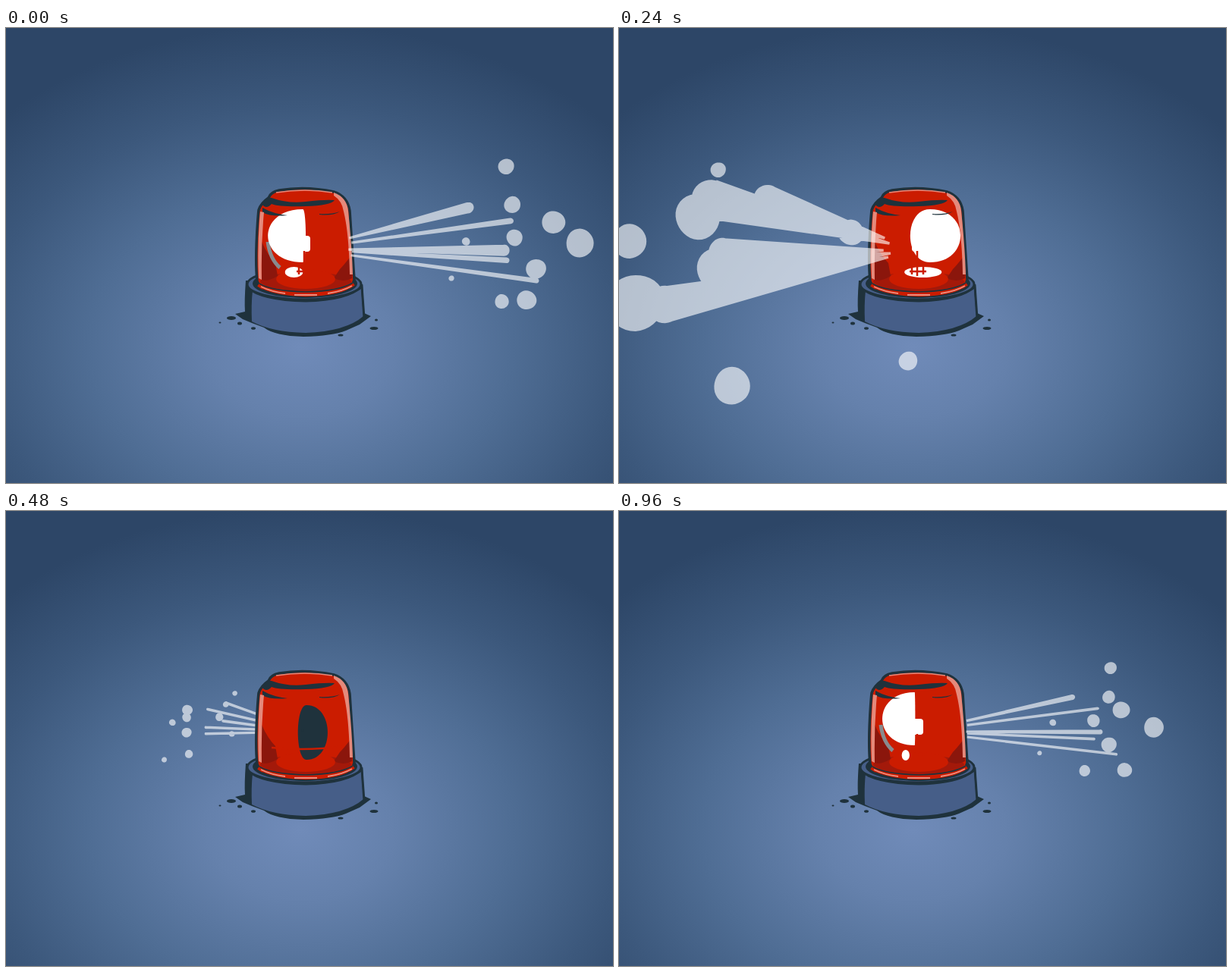
Recreate the animation shown at these times as an HTML page. Size 800x600 px, loop 1 s.

```html
<!DOCTYPE html>
<html lang="en">
<head>
<meta charset="utf-8">
<title>Beacon</title>
<style>
html, body { margin: 0; width: 100%; height: 100%; overflow: hidden; background: #2d4667; }
svg { display: block; width: 100%; height: 100%; }
.ink { fill: #1f323c; }
.red { fill: #cb1c00; }
.deep { fill: #8b160c; }
.shine { fill: #e5897b; }
.blue { fill: #465e88; }
.white { fill: #fff; }
.line { fill: none; stroke: #1f323c; stroke-width: 3; }
.thin { fill: none; stroke: #cb1c00; stroke-width: 2.5; }
.veil { fill: #fff; opacity: .62; }
</style>
</head>
<body>
<svg viewBox="0 0 800 600">
  <defs>
    <radialGradient id="floor" gradientUnits="userSpaceOnUse" cx="0" cy="0" r="1"
      gradientTransform="translate(388 420) scale(560 425)">
      <stop offset="0" stop-color="#708bb9"/>
      <stop offset=".22" stop-color="#6581ac"/>
      <stop offset=".5" stop-color="#4f6d94"/>
      <stop offset=".75" stop-color="#3c587c"/>
      <stop offset="1" stop-color="#2d4667"/>
    </radialGradient>
  </defs>
  <rect width="800" height="600" fill="url(#floor)"/>
  <path id="behind" class="veil"/>

  <g class="ink">
    <path d="M316 333Q314 360 315 374L302 377L312 384L324 389L340 395Q354 406 392 407Q430 406 448 399L466 391L481 380L472 376L470 338Z"/>
    <ellipse cx="297" cy="382.500" rx="6" ry="2.500"/>
    <ellipse cx="308" cy="389.500" rx="3" ry="2"/>
    <ellipse cx="282" cy="388.500" rx="1.500" ry="1"/>
    <ellipse cx="326" cy="396" rx="3" ry="1.800"/>
    <ellipse cx="488" cy="385" rx="2" ry="1.500"/>
    <ellipse cx="485" cy="396" rx="5.500" ry="2"/>
    <ellipse cx="441" cy="405" rx="3.500" ry="1.600"/>
  </g>
  <ellipse class="blue" cx="393" cy="338" rx="75" ry="20" stroke="#1f323c" stroke-width="3"/>
  <ellipse class="ink" cx="394" cy="337" rx="69" ry="19"/>
  <path class="blue" d="M325 346Q342 359 395 360Q446 359 468 344L471 380Q448 400 395 402Q350 401 324 387Q323 365 325 346Z"/>
  <path class="line" d="M318 342Q336 359 395 360Q450 359 469 341L472 382"/>

  <path class="red" stroke="#1f323c" stroke-width="3.500" d="M331 334C328 305 331 260 333 240Q336 231 346 224Q349 216 360 214Q395 208 432 216Q450 222 453 241C455 275 457 300 459 332Q456 350 395 353Q335 350 331 334Z"/>
  <ellipse cx="395" cy="335" rx="60" ry="13" fill="#a3190a"/>
  <path class="deep" d="M337 282Q345 300 355 310L358 327Q345 335 337 332Z"/>
  <path class="deep" d="M455 300Q446 312 440 318L432 330Q445 336 456 330Z"/>
  <ellipse class="red" cx="395" cy="331" rx="39" ry="13"/>
  <path d="M333 338Q350 351 395 352Q440 351 458 337" fill="none" stroke="#cb1c00" stroke-width="6"/>
  <path class="line" style="stroke-width:1.500" d="M334 337Q350 347 395 348Q440 347 457 336M338 345Q358 354 395 355Q440 353 453 344"/>
  <path d="M336 341Q350 348 368 350M424 350Q444 347 456 340M380 352H410" fill="none" stroke="#ee8c7d" stroke-width="1.800"/>

  <g id="lit">
    <path id="shade" d="M345 282Q348 305 361 316" fill="none" stroke="#888b8e" stroke-width="5"/>
    <path id="dish" class="white"/>
    <rect class="white" x="386" y="274" width="15" height="21" rx="4"/>
    <ellipse id="mirror" class="white" cy="322" ry="7"/>
    <path class="thin" d="M393 294V327M386 313v12M401 313v12M383 321h22"/>
  </g>
  <g id="dark">
    <path id="back" class="ink"/>
    <rect id="stem" class="red" y="255" height="75"/>
    <path class="thin" d="M350 312Q396 317 446 310"/>
    <circle class="ink" cx="391" cy="289" r="2"/>
    <circle class="ink" cx="391" cy="304" r="2"/>
  </g>

  <path class="ink" d="M337 232Q343 222 350 224Q372 232 395 229Q420 226 433 227Q428 234 395 235Q360 236 350 232Q343 240 337 232Z"/>
  <path class="ink" d="M338 237Q352 245 371 247Q348 249 338 243ZM413 245Q428 246 440 242Q430 248 413 246Z"/>
  <path class="shine" d="M432 217Q449 223 451 241Q456 290 457 325L453 325Q452 270 445 242Q443 228 432 221Z"/>
  <path class="shine" d="M335 242L340 243Q336 285 337 332L333 330Q331 285 335 242Z"/>
  <path d="M356 217Q395 211 430 217" fill="none" stroke="#e5897b" stroke-width="1.500"/>

  <path id="ahead" class="veil"/>
</svg>
<script>
const STEP = 40, LOOP = 1000, FACING = 160;
const CX = 395, CY = 290, CAMERA = 250, TILT = .1, LAMP = 62;
const $ = id => document.getElementById(id);
const set = (id, attrs) => { for (const key in attrs) $(id).setAttribute(key, attrs[key]); };
const clamp = v => Math.max(0, Math.min(1, v));

// Drops and beam tips as seen when the light faces the viewer: x, y, radius.
const drops = [
  [527, 110, 69], [233, 122, 16], [274, 181, 20], [168, 260, 45], [543, 237, 36],
  [611, 274, 14.5], [211, 399, 21], [540, 384, 52], [629, 407, 9.5], [529, 498, 28]
].map(p => place(p, 2 + p[2] / 12));
const tips = [
  [392, 197, 82], [345, 200, 43], [306, 292, 65], [364, 400, 112], [410, 325, 80]
].map(p => place(p, 1.4 + p[2] / 30));

// Puts a point into space so that it appears at p under the given zoom.
function place([x, y, r], zoom) {
  const z = CAMERA * (1 - 1 / zoom);
  return { x: (x - CX) / zoom, y: (y - CY - TILT * z) / zoom, z, r, zoom };
}

function project({ x, y, z }, sin, cos, reach = 1) {
  const depth = (z * cos + x * sin) * reach;
  const zoom = CAMERA / (CAMERA - depth);
  return {
    x: CX + (x * cos - z * sin) * reach * zoom,
    y: CY + y * reach * zoom + TILT * depth,
    zoom, depth
  };
}

const poly = pts => 'M' + pts.map(p => p.map(v => v.toFixed(1)).join(' ')).join('L') + 'Z';

function blob(x, y, r, seed) {
  return poly(Array.from({ length: 36 }, (_, n) => {
    const a = n * Math.PI / 18;
    const q = r * (1 + .025 * Math.cos(2 * a + seed) + .015 * Math.cos(3 * a + seed * 2));
    return [x + q * Math.cos(a), y + q * Math.sin(a)];
  }));
}

function beam(tip, seed, sin, cos) {
  const end = project(tip, sin, cos);
  const start = project(tip, sin, cos, LAMP / Math.hypot(tip.x, tip.z));
  // Beams thin out quickly as they turn away from the viewer.
  const r = Math.max(1.8, tip.r * (end.zoom / tip.zoom) ** 3.4);
  const a = Math.atan2(end.y - start.y, end.x - start.x);
  const side = (p, w) => [p.x - w * Math.sin(a), p.y + w * Math.cos(a)];
  return {
    depth: end.depth,
    d: poly([side(start, -1.6), side(end, -r), side(end, r), side(start, 1.6)]) + blob(end.x, end.y, r, seed)
  };
}

function drop(p, seed, sin, cos) {
  const q = project(p, sin, cos);
  return { depth: q.depth, d: blob(q.x, q.y, p.r * q.zoom / p.zoom, seed) };
}

// Two half ovals that share an upright axis.
function bowl(x, top, bottom, left, right) {
  const l = x - left * 4 / 3, r = x + right * 4 / 3;
  return `M${x} ${top}C${r} ${top} ${r} ${bottom} ${x} ${bottom}C${l} ${bottom} ${l} ${top} ${x} ${top}Z`;
}

function draw(time) {
  const t = Math.floor((time % LOOP) / STEP) * STEP;
  const turn = 2 * Math.PI * (t - FACING) / LOOP;
  const sin = Math.sin(turn), cos = Math.cos(turn);

  const parts = [
    ...tips.map((p, n) => beam(p, n, sin, cos)),
    ...drops.map((p, n) => drop(p, n, sin, cos))
  ];
  const join = test => parts.filter(test).map(p => p.d).join('');
  set('behind', { d: join(p => p.depth < 0) });
  set('ahead', { d: join(p => p.depth >= 0) });

  const lit = cos > 0;
  set('lit', { display: lit ? 'inline' : 'none' });
  set('dark', { display: lit ? 'none' : 'inline' });
  if (lit) {
    const left = 46 * clamp(cos - .65 * sin), right = 46 * cos * Math.min(1, 1 + sin);
    set('dish', { d: bowl(403 + 14 * sin, 239, 309, left, right) });
    set('mirror', { cx: 393 + 16 * sin, rx: 30 * cos ** 1.5 });
    set('shade', { opacity: clamp(-8 * sin - 5.5) });
  } else {
    const left = 46 * clamp(-cos - .2 * sin), right = 46 * clamp(-cos + .2 * sin);
    const gap = 39 * clamp((-cos - .7) / .3);
    set('back', { d: bowl(396, 256, 328, left, right) });
    set('stem', { x: 392 - gap / 2, width: gap });
  }
}

const begin = performance.now();
function tick() {
  draw(performance.now() - begin);
  requestAnimationFrame(tick);
}
tick();
</script>
</body>
</html>
```
